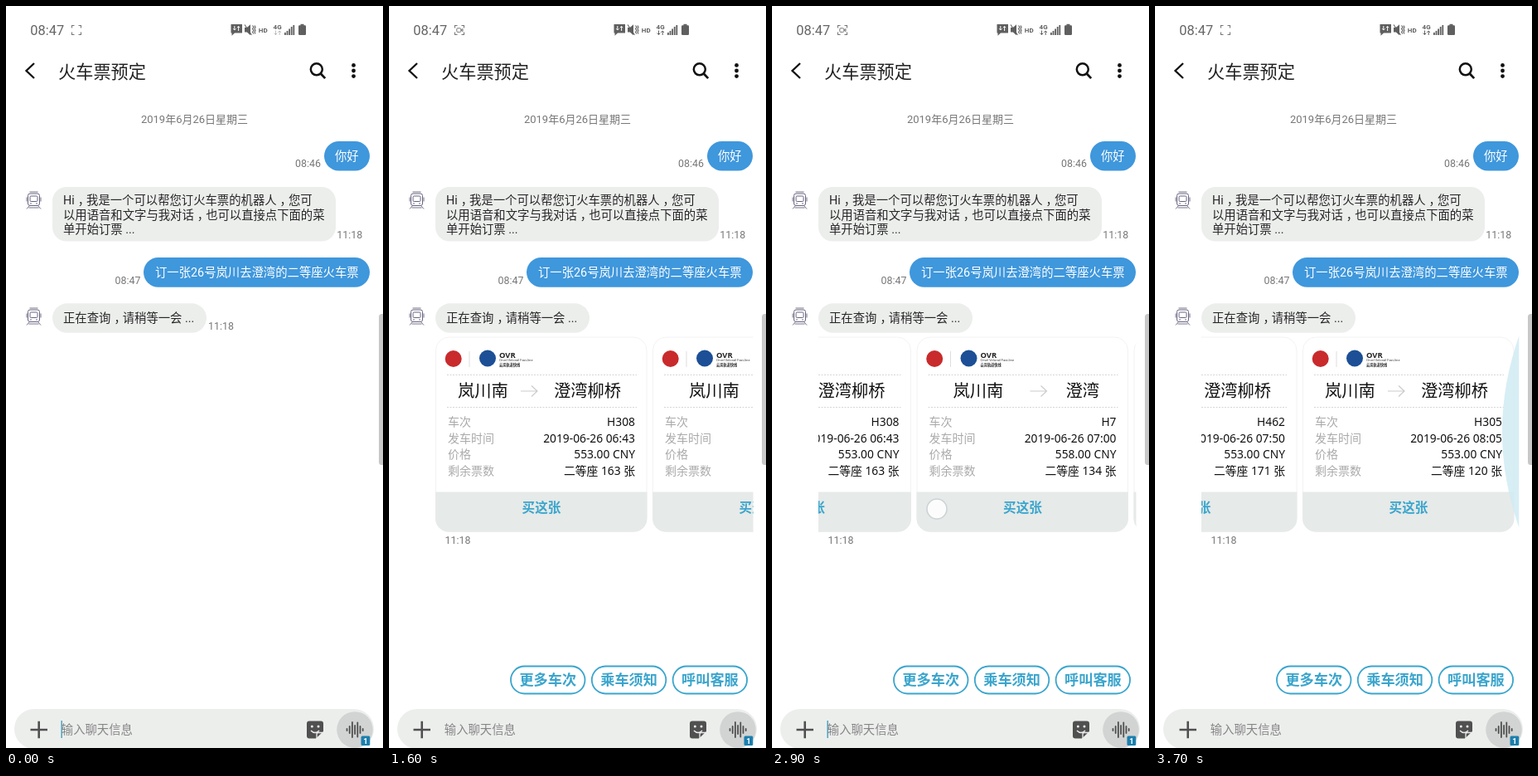
Animation, 455 px wide and 894 px high, one loop 3.8 s. Source, as an HTML page:

```html
<!DOCTYPE html>
<html lang="zh-CN">
<head>
<meta charset="utf-8">
<title>订票对话</title>
<style>
html, body { margin: 0; width: 100%; height: 100%; overflow: hidden; background: #fff; }
svg { display: block; width: 100vw; height: 100vh; }
text { font-family: Roboto, "Noto Sans CJK SC", "Noto Sans CJK", sans-serif; }
.card text { font-family: "Noto Sans", "Noto Sans CJK SC", "Noto Sans CJK", sans-serif; }
</style>
</head>
<body>
<svg id="stage" viewBox="0 0 455 894" preserveAspectRatio="none"></svg>
<script>
const LOOP = 3800, STEP = 100;
const PITCH = 262, GREY = '#777', BLUE = '#3aa5cd';

const text = (x, y, size, fill, str, extra = '') =>
  `<text x="${x}" y="${y}" font-size="${size}" fill="${fill}" ${extra}>${str}</text>`;
const rect = (x, y, w, h, r, fill, extra = '') =>
  `<rect x="${x}" y="${y}" width="${w}" height="${h}" rx="${r}" fill="${fill}" ${extra}/>`;
const line = (d, color, width, extra = '') =>
  `<path d="${d}" fill="none" stroke="${color}" stroke-width="${width}" ${extra}/>`;
const circle = (x, y, r, fill, extra = '') =>
  `<circle cx="${x}" cy="${y}" r="${r}" fill="${fill}" ${extra}/>`;
const group = (id, body, extra = '') => `<g id="${id}" ${extra}>${body}</g>`;
const MID = 'text-anchor="middle"', END = 'text-anchor="end"', BOLD = 'font-weight="700"';

// Commas sit in the middle of their full-width cell.
const comma = s => s.replace(/，/g, '<tspan dx="4">，</tspan><tspan dx="-4">\u200b</tspan>');
const say = (x, y, str, fill = '#262626') => text(x, y, 14.35, fill, comma(str));
const stamp = (x, y, str, extra = '') => text(x, y, 12.4, GREY, str, MID + ' ' + extra);

function statusBar() {
  const ink = '#5f5f5f';
  const bars = [3, 5, 7.5, 10, 12].map((h, i) => rect(336 + i * 2.6, 35 - h, 1.8, h, 0, ink)).join('');
  return text(29.3, 35, 16.4, '#666', '08:47') +
    line('M79.5 26.5v-3h3M87.5 23.5h3v3M90.5 31.5v3h-3M82.5 34.5h-3v-3', '#777', 1.1) +
    group('cam', rect(81.8, 26.8, 5, 4.6, 1, 'none', 'stroke="#777"') + line('M87 29l2-1.4v3z', '#777', 1)) +
    `<path d="M271.5 22h13.5v10.5h-9l-3.5 3.2v-3.2h-1z" fill="${ink}"/>` +
    line('M275.8 24v5m-1.6-1.7l1.6 1.7 1.6-1.7M280.6 30v-5.5m-1.6 1.7l1.6-1.7 1.6 1.7', '#fff', 1) +
    `<path d="M288 26h2.8l4.2-3.8v13l-4.2-3.8H288z" fill="${ink}"/>` +
    line('M288 22.5l8.5 12.5M297.5 23.5l1.5 2-1.5 2 1.5 2-1.5 2 1.5 2M300 23.5l1 2-1 2 1 2-1 2 1 2', ink, 1.1) +
    text(304.8, 31.6, 8, ink, 'HD', BOLD) + text(322.6, 28, 8, ink, '4G', BOLD) +
    group('data', line('M325.5 29.5v5m-1.8-1.8l1.8 1.8 1.8-1.8M330.2 35v-5m-1.8 1.8l1.8-1.8 1.8 1.8', ink, 1)) +
    bars + rect(353, 23.3, 9, 11.7, 1.2, ink) + rect(355.5, 21.8, 4, 2, 0, ink);
}

function header() {
  return line('M34 69l-9.5 9 9.5 9', '#111', 2.3) +
    text(63, 86.5, 21.2, '#222', '火车票预定') +
    circle(374.8, 76.3, 7, 'none', 'stroke="#111" stroke-width="2.5"') +
    line('M379.8 81.5l5.4 5.6', '#111', 2.8) +
    [71.4, 78, 84.6].map(y => circle(419.5, y, 2.4, '#111')).join('') +
    text(227.5, 140.7, 13, GREY, '2019年6月26日星期三', MID);
}

function avatar(y) {
  const ink = '#66647f';
  return `<g transform="translate(33.5 ${y})">` +
    rect(-7, -8.5, 14, 14.5, 2.5, '#fff', `stroke="${ink}"`) +
    rect(-4.5, -5.5, 9, 6.5, 1.2, 'none', `stroke="${ink}"`) +
    line('M-5 -10.5h10M-8.5 -4v5M8.5 -4v5M-5 6l-3.5 4M5 6l3.5 4M-6 8.5h12M-4.5 3.5h2M2.5 3.5h2', ink, 0.9) + '</g>';
}

function chat() {
  const pale = '#eceeec', blue = '#3f97dc';
  return rect(384, 163, 55, 35.5, 17.7, blue) + say(397, 186.2, '你好', '#fff') + stamp(364.5, 194.4, '08:46') +
    avatar(234.5) + rect(56, 218, 342, 65.5, 17, pale) +
    say(69, 239, 'Hi，我是一个可以帮您订火车票的机器人，您可') +
    say(69, 256.7, '以用语音和文字与我对话，也可以直接点下面的菜') +
    say(69, 274.4, '单开始订票 ...') + stamp(414.8, 279.6, '11:18') +
    rect(166, 303, 273, 35.8, 17.8, blue) +
    say(180, 326.2, '订一张26号岚川去澄湾的二等座火车票', '#fff') + stamp(147, 334.6, '08:47') +
    avatar(374.5) + rect(56, 358.3, 186, 35.5, 17.7, pale) + say(69, 381.4, '正在查询，请稍等一会 ...') +
    stamp(259.5, 389.6, '11:18', 'id="oldStamp"');
}

const buy = (fill, extra = '') => text(128, 211.4, 15.6, fill, '买这张', `${MID} ${BOLD} ${extra}`);

const tickets = [
  { no: 'H308', time: '06:43', price: 553, left: 163 },
  { no: 'H7', time: '07:00', price: 558, left: 134, short: true },
  { no: 'H462', time: '07:50', price: 553, left: 171 },
  { no: 'H305', time: '08:05', price: 553, left: 120 }
];

function card(t, i) {
  const [from, arrow, to] = t.short ? [44, 137, 180] : [27, 103, 143];
  const rows = [['车次', t.no], ['发车时间', '2019-06-26 ' + t.time],
    ['价格', t.price + '.00 CNY'], ['剩余票数', `二等座 ${t.left} 张`]];
  const dash = y => line(`M14 ${y}h229`, '#d5d5d5', 1, 'stroke-dasharray="2 1.5"');
  return `<g transform="translate(${i * PITCH})">` +
    rect(0.5, 0.5, 254.5, 234.5, 16, '#fff', 'stroke="#f2f2f2"') +
    '<path d="M0 187h255.5v32a16 16 0 0 1-16 16h-223.5a16 16 0 0 1-16-16z" fill="#e6eae8"/>' +
    circle(21.7, 26.5, 10, '#c92a2c') + line('M41 17.5v19', '#ddd', 1) + circle(63, 26, 10, '#1c4f96') +
    text(77, 25.2, 9.4, '#222', 'OVR', BOLD) + text(77, 29.8, 3.9, '#333', 'Orvel Velorail Fast-line') +
    text(77, 35, 4.2, '#222', '云岚轨道快线', BOLD) +
    dash(46) + dash(85) +
    text(from, 72.8, 20.3, '#111', '岚川南') + text(to, 72.8, 20.3, '#111', t.short ? '澄湾' : '澄湾柳桥') +
    line(`M${arrow} 65.5h20m-7-6.5l7 6.5-7 6.5`, '#ccc', 1.2) +
    rows.map(([k, v], n) => text(15, 107.7 + n * 19.5, 14, '#aaa', k) +
      text(241, 107.7 + n * 19.5, 13.8, '#111', v, END)).join('') +
    buy(BLUE) + '</g>';
}

function loader(i) {
  const arc = (d, color) => line(d, color, 2.6, 'stroke-linecap="round"');
  return `<g transform="translate(${i * PITCH})">` +
    rect(0, 0, 255.5, 234.5, 16, '#ebeeed') +
    '<path d="M0 186v-170a16 16 0 0 1 16-16h223.5a16 16 0 0 1 16 16v170z" fill="#e7ebe9"/>' +
    `<g class="spin">${arc('M-9.5 -25.3A27 27 0 0 1 26.9 2.4', '#42a5e6')}${
      arc('M9.5 25.3A27 27 0 0 1 -26.9 -2.4', '#4bc79a')}</g>` +
    buy('#6dbcd6') + '</g>';
}

function chips() {
  return ['更多车次', '乘车须知', '呼叫客服'].map((s, i) => {
    const x = 147 + i * 97.8;
    return rect(x, 795.5, 89.5, 33, 16.5, '#fff', `stroke="${BLUE}" stroke-width="1.8"`) +
      text(x + 44.8, 818.2, 17.2, BLUE, s, `${MID} ${BOLD}`);
  }).join('');
}

function inputBar() {
  const ink = '#505050';
  const wave = [2, 8, 18, 10, 17, 8, 2].map((h, i) =>
    line(`M${411.5 + i * 3.2} ${872 - h / 2}v${h}`, ink, 1.8, 'stroke-linecap="round"')).join('');
  return rect(10, 847, 434, 48, 24, '#eceeec') + line('M29.5 872h20.5M39.7 861.8v20.5', ink, 2.6) +
    text(66.8, 877.2, 14.35, '#858585', '输入聊天信息') +
    rect(66.5, 861, 1.3, 21, 0, '#3795b8', 'id="caret"') +
    `<path d="M366 861.5h14a3 3 0 0 1 3 3v9.5l-9 8.5h-8a3 3 0 0 1-3-3v-15a3 3 0 0 1 3-3z" fill="${ink}"/>` +
    circle(369.3, 868, 1.5, '#eceeec') + circle(377, 868, 1.5, '#eceeec') +
    line('M368 873q5 5 10 0', '#eceeec', 1.6) + line('M375 883v-5.5q0-2 2-2h6.5', '#eceeec', 1.3) +
    circle(421, 872, 21.8, '#d2d4d3') + wave +
    rect(428.5, 879.5, 10.8, 11.5, 1.5, '#1b7fae') + text(433.9, 888.8, 9.5, '#fff', '1', `${MID} ${BOLD}`);
}

const stage = document.getElementById('stage');
stage.innerHTML =
  '<clipPath id="clip"><rect x="56" y="390" width="383.5" height="400"/></clipPath>' +
  statusBar() + header() + chat() +
  '<g clip-path="url(#clip)">' +
    group('loaders', [0, 1].map(loader).join(''), 'class="card"') +
    group('cards', tickets.map(card).join(''), 'class="card"') +
    '<path id="glow" fill="#d0ecf4" opacity=".85"/></g>' +
  group('newStamp', stamp(83, 648.3, '11:18')) + group('chips', chips()) +
  group('touch', circle(0, 0, 12, '#fff', 'fill-opacity=".85" stroke="#ccd3d6" stroke-width="1.6"')) +
  rect(450, 371, 10, 182, 3.5, '#c8c8c8') + inputBar();

const el = id => document.getElementById(id);
const show = (id, on) => el(id).setAttribute('visibility', on ? 'visible' : 'hidden');
const move = (id, x, y) => el(id).setAttribute('transform', `translate(${x} ${y})`);
const within = (t, ...spans) => spans.some(([a, b]) => t >= a && t < b);

// Linear interpolation through [time, value] points.
function track(t, pts) {
  if (t <= pts[0][0]) return pts[0][1];
  for (let i = 1; i < pts.length; i++) {
    const [a, v] = pts[i - 1], [b, w] = pts[i];
    if (t <= b) return v + (w - v) * (t - a) / (b - a);
  }
  return pts[pts.length - 1][1];
}

const rise = [[1200, 77], [1300, 64.5], [1400, 36], [1500, 15], [1600, 0]];
const swipe = [[2600, 0], [2700, 25], [2800, 75], [2900, 143.5], [3000, 255], [3100, 390],
  [3200, 510], [3300, 596], [3400, 645], [3500, 664]];

function draw(t) {
  const dy = track(t, rise), scroll = track(t, swipe), open = t >= 1200, loaded = t >= 1600;
  show('caret', within(t, [0, 300], [800, 1300], [1900, 2400], [2900, 3400]));
  show('cam', within(t, [400, 700], [900, 3600]));
  el('data').setAttribute('opacity', t < 700 ? 0.4 : 1);
  show('oldStamp', !open);
  show('newStamp', open);
  show('chips', open);
  show('loaders', open && !loaded);
  show('cards', loaded);
  move('loaders', 56, 398.5 + dy);
  move('cards', 56 - scroll, 398.5);
  move('newStamp', 0, dy);
  const turn = (t - 1300) * 0.36;
  for (const s of document.querySelectorAll('.spin'))
    s.setAttribute('transform', `translate(127.5 92.5) rotate(${turn})`);
  show('touch', within(t, [2500, 3000]));
  move('touch', 342.5 - scroll, 606);
  const pull = track(t, [[3500, 0], [3700, 41]]);
  el('glow').setAttribute('d', `M439.5 397Q${439.5 - pull} 513 439.5 629z`);
}

const start = performance.now();
function tick() {
  const t = Math.max(0, performance.now() - start) % LOOP;
  draw(Math.floor(t / STEP) * STEP);
  requestAnimationFrame(tick);
}
tick();
</script>
</body>
</html>
```
